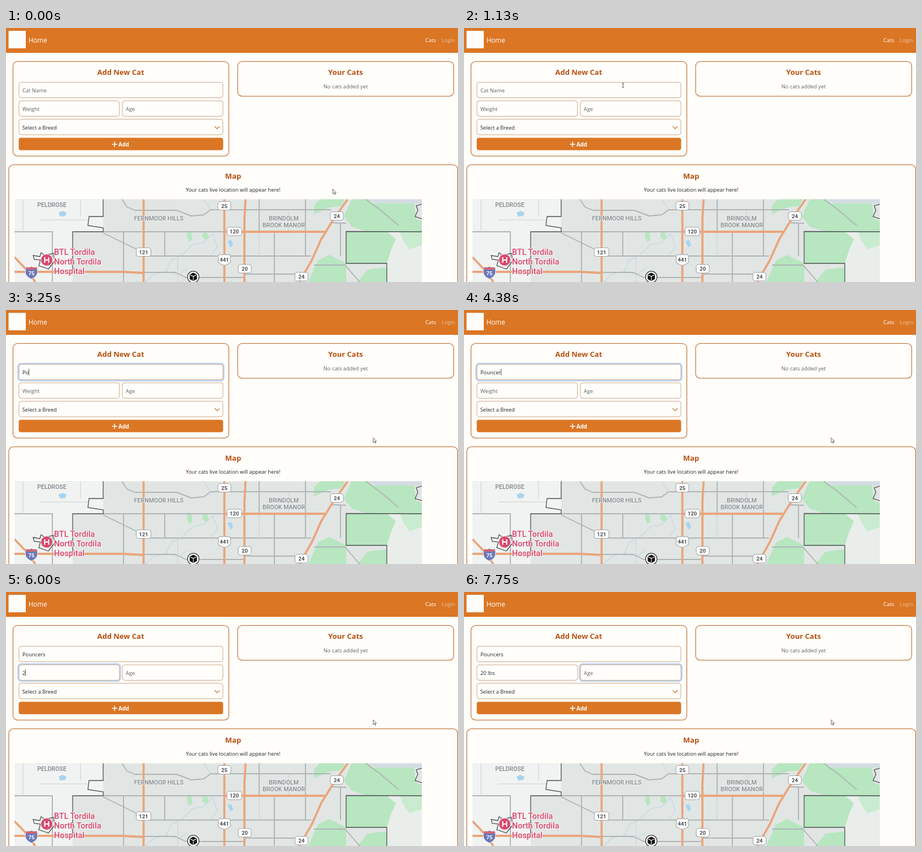
Recreate the animation shown at these times as an HTML page. Size 800 px wide and 450 px high, loop 8 s.

```html
<!DOCTYPE html>
<html lang="en">
<head>
<meta charset="utf-8">
<title>Add New Cat</title>
<style>
  html, body { margin: 0; width: 100%; height: 100%; overflow: hidden; background: #fffefb; }
  svg { display: block; width: 100vw; height: 100vh; }
  text { font-family: "Open Sans", "Noto Sans", sans-serif; font-size: 9.4px; fill: #22272a; }
  .mid { text-anchor: middle; }
  .title { font-size: 13px; font-weight: 700; fill: #b9500f; text-anchor: middle; }
  .card { fill: #fffefb; stroke: #c67c47; stroke-width: 1.3; }
  .field { fill: #fffefb; stroke: #c99d79; stroke-width: .9; }
  .hint { fill: #5c6461; }
  .map text { font-family: Roboto, sans-serif; }
  .map .area { font-size: 10.6px; font-weight: 500; fill: #85898c; text-anchor: middle;
    stroke: #eef1f1; stroke-width: 1.6; paint-order: stroke; }
  .map .place { font-size: 14.4px; font-weight: 500; fill: #d9486b;
    stroke: #f6f4f5; stroke-width: 2; paint-order: stroke; }
  .map .num { font-size: 9.6px; font-weight: 700; fill: #4c5053; text-anchor: middle; }
  .road { fill: none; stroke: #b0b4b5; stroke-width: 1.9; stroke-linejoin: round; }
  .main { fill: none; stroke: #eba57b; stroke-width: 3.8; }
  .edge { fill: none; stroke: #4d5052; stroke-width: 1.3; }
  .sign { fill: #fff; stroke: #a0a4a6; stroke-width: 1.1; }
</style>
</head>
<body>
<svg viewBox="0 0 800 450">
  <rect width="800" height="44" fill="#db7624"/>
  <rect x="4.5" y="5" width="30.5" height="31" fill="#fffdf9"/>
  <text x="39.7" y="25.6" style="font-size:11.7px;fill:#fff">Home</text>
  <text x="742" y="25" style="font-size:9.6px;fill:#fff">Cats</text>
  <text x="771" y="25" style="font-size:9.5px;fill:#f0c39d">Login</text>

  <rect class="card" x="12.4" y="59.3" width="382" height="167.6" rx="8"/>
  <rect class="card" x="410" y="59.3" width="382.4" height="61.6" rx="8"/>
  <rect class="card" x="4.9" y="242.4" width="794.5" height="240" rx="8"/>
  <text class="title" x="203" y="83.2">Add New Cat</text>
  <text class="title" x="601" y="83.2">Your Cats</text>
  <text class="title" x="402" y="266.6">Map</text>
  <text class="mid hint" x="601" y="107">No cats added yet</text>
  <text class="mid" x="402" y="290.3" style="font-size:9.27px">Your cats live location will appear here!</text>

  <g id="fields"></g>
  <rect class="field" x="22.9" y="161.7" width="361" height="27.4" rx="4"/>
  <text x="28.8" y="179.5" style="font-size:9.25px">Select a Breed</text>
  <path d="M369.7 174.6l4 4 4-4" fill="none" stroke="#d08045" stroke-width="1.4" stroke-linecap="round" stroke-linejoin="round"/>
  <rect x="22.5" y="194.4" width="361.8" height="22" rx="4" fill="#db7624"/>
  <path d="M192.2 202v8M188.2 206h8" stroke="#fff" stroke-width="1.7" stroke-linecap="round"/>
  <text x="199" y="209.5" style="font-size:9.7px;font-weight:700;fill:#fff">Add</text>

  <clipPath id="frame"><rect x="15" y="303.5" width="721" height="147"/></clipPath>
  <g class="map" clip-path="url(#frame)">
    <rect x="15" y="303" width="721" height="147" fill="#e1e6e4"/>
    <path d="M15 303H172V361H118V450H15Z" fill="#f1f3f2"/>
    <path d="M602 361H736V450H674V417H602Z" fill="#e9eeeb"/>
    <g fill="#b7e6c0">
      <path d="M545 330V314L556 303H600L593 316L572 318Z"/>
      <path d="M606 316L612 303H640L650 311H722L726 338L736 342V361H640L612 352L598 334Z"/>
      <path d="M602 361H674L690 374L682 392L674 417H602Z"/>
      <path d="M552 412L572 402L602 417V450H535Z"/>
      <path d="M622 450L640 428L674 424V450Z"/>
      <path d="M349 361l7 2 3 8-6 4-6-5ZM322 358l6 4 2 13-6 4-4-11Z"/>
    </g>
    <path d="M697 361H736V385L714 392L704 378Z" fill="#c9ebd0"/>
    <path d="M640 303H736V311H654Z" fill="#d4dce3"/>
    <g fill="#a8d4ef">
      <path d="M93 327l7-3 7 3-2 6-9 1Z"/>
      <path d="M392 377l7-1 3 9-5 4Z"/>
    </g>
    <path d="M247 450L262 436L284 431L292 412L312 402L330 384L350 380L366 364M284 431L305 437L322 426M366 364L374 388L362 404" fill="none" stroke="#bcd7e5" stroke-width="1.1"/>

    <path class="road" d="M172 361H386M172 363L229 391L256 404H540M205 303L214 317L228 323H302L328 333L350 331L362 322H575M15 361H82V450M208 361V450M281 361V404M448 303V361M475 361V450M530 303V404M592 346V404M243 433H300L318 442H422M422 436H515M602 346L575 345M545 420H600L626 450M636 303L662 322L695 350"/>
    <path d="M132 303V334M60 340H146M30 303V361M304 404V450M350 303L362 322M500 323V361M448 361V404" fill="none" stroke="#cdd1d2" stroke-width="1.1"/>
    <path class="main" d="M243.5 303V450M386.5 303V450M424 303L422 340V450M386 361H564M605 303L579 340L558 374L541 412L519 450M15 432H206L243 434"/>
    <path class="main" d="M15 406L36 428L52 450"/>
    <path class="edge" d="M172 303V334H147L145 350L172 354V361H118V432M736 361L602 360.5V417H674V450M736 312L726 315L729 323L724 334L736 338M48 403L60 405L62 398L69 403L84 399L86 413L75 427L58 421L61 411L50 410Z"/>

    <text class="area" x="81" y="317">PELDROSE</text>
    <text class="area" x="270.5" y="340.5">FERNMOOR HILLS</text>
    <text class="area" x="491.5" y="340.5">BRINDOLM</text>
    <text class="area" x="491.5" y="352.7">BROOK MANOR</text>
    <circle cx="72" cy="411" r="10.4" fill="#d9486b" stroke="#f7dfe5" stroke-width="1"/>
    <path d="M68.5 406v10M75.5 406v10M68.5 411h7" stroke="#fff" stroke-width="2.1"/>
    <text class="place" x="85" y="402">BTL Tordila</text>
    <text class="place" x="85" y="419">North Tordila</text>
    <text class="place" x="85" y="436">Hospital</text>

    <g id="signs"></g>
    <path class="sign" d="M378 401Q382 403 386.5 400.8Q391 403 395 401L398 405Q395 409 398 413Q397 418 386.5 420.5Q376 418 375 413Q378 409 375 405Z"/>
    <text class="num" x="386.5" y="414">441</text>
    <path d="M36 423Q40.5 425 45 422.5Q49.5 425 54 423Q61 438 45 445Q29 438 36 423Z" fill="#6b78b8" stroke="#f4f4f6"/>
    <path d="M36 423.5Q40.5 425.5 45 423Q49.5 425.5 54 423.5L55.5 428H34.5Z" fill="#cf6574"/>
    <text class="num" x="45" y="438" style="fill:#fff">75</text>

    <circle cx="331.5" cy="441" r="10.2" fill="#f8faf9" stroke="#3a3d3e" stroke-width="1.2"/>
    <path d="M331.5 433.6l6.4 3.2v8l-6.4 3.4l-6.4-3.4v-8Z" fill="#111"/>
    <path d="M325.8 437.4l5.7 2.7l5.7-2.7M331.5 440.1v7.4" fill="none" stroke="#f8faf9" stroke-width="1.1"/>
  </g>

  <path id="arrow" d="M0 0V8.4L2 6.6L3.3 9.6L4.5 9L3.2 6.2H5.9Z" fill="#fff" stroke="#444" stroke-width=".8"/>
  <path id="beam" d="M-1.7-4Q0-4 0-3Q0-4 1.7-4M0-3.5V3.5M-1.7 4Q0 4 0 3Q0 4 1.7 4" fill="none" stroke="#444" stroke-width=".9"/>
</svg>
<script>
const LOOP = 8000, TICK = 125, BLINK = 530;
const byId = id => document.getElementById(id);

function add(parent, tag, attrs, label = "") {
  const el = document.createElementNS("http://www.w3.org/2000/svg", tag);
  for (const key in attrs) el.setAttribute(key, attrs[key]);
  el.textContent = label;
  return parent.appendChild(el);
}

[["25", 386.5, 315], ["24", 585.5, 333], ["120", 404, 360.5], ["121", 243.5, 397],
 ["20", 422.5, 426.5], ["24", 523, 440.5]].forEach(([label, x, y]) => {
  const w = label.length > 2 ? 26 : 23;
  add(byId("signs"), "rect", { class: "sign", x: x - w / 2, y: y - 7.5, width: w, height: 15, rx: 4 });
  add(byId("signs"), "text", { class: "num", x, y: y + 3.5 }, label);
});

// keys: the times at which each letter of the value is typed
const fields = [
  { x: 22.9, y: 96.2, w: 361, hint: "Cat Name", value: "Pouncers", from: 2000, to: 4875,
    keys: [3125, 3250, 3500, 3625, 3750, 4000, 4375, 4500] },
  { x: 22.9, y: 129, w: 178, hint: "Weight", value: "20 lbs", from: 4875, to: 7125,
    keys: [6000, 6250, 6500, 6625, 6750, 7000] },
  { x: 206, y: 129, w: 178, hint: "Age", value: "", from: 7125, to: LOOP, keys: [] }
];
const HEIGHT = 27.4;

for (const f of fields) {
  const g = byId("fields"), box = { x: f.x, y: f.y, width: f.w, height: HEIGHT, rx: 4 };
  f.ring = add(g, "rect", { x: f.x - 1.4, y: f.y - 1.4, width: f.w + 2.8, height: HEIGHT + 2.8,
    rx: 5.2, fill: "none", stroke: "#bdd5f7", "stroke-width": 2.8 });
  add(g, "rect", { ...box, class: "field" });
  f.text = add(g, "text", { x: f.x + 6, y: f.y + 17.9 });
  f.caret = add(g, "rect", { y: f.y + 7.8, width: .8, height: 12, fill: "#333" });
}

// time, x, y of the pointer
const path = [[0, 578.5, 285.5], [125, 578.5, 285.5], [1000, 281.5, 101.5], [1125, 281.5, 101.5],
  [1500, 300.5, 115.3], [2500, 300.5, 115.3], [3125, 650, 226.5], [LOOP, 650, 226.5]];

function pointerAt(t) {
  const i = path.findIndex(p => p[0] > t);
  const [t0, x0, y0] = path[i - 1], [t1, x1, y1] = path[i];
  const u = (t - t0) / (t1 - t0), k = u * u * (3 - 2 * u);
  return [x0 + (x1 - x0) * k, y0 + (y1 - y0) * k];
}

function drawField(f, t) {
  const typed = f.keys.filter(k => k <= t);
  const value = f.value.slice(0, typed.length);
  const focused = t >= f.from && t < f.to;
  const sinceKey = t - Math.max(f.from, ...typed);
  f.text.textContent = value || f.hint;
  f.text.setAttribute("class", value ? "" : "hint");
  f.ring.style.display = focused ? "" : "none";
  f.caret.style.display = focused && Math.floor(sinceKey / BLINK) % 2 === 0 ? "" : "none";
  f.caret.setAttribute("x", f.x + 6 + (value ? f.text.getComputedTextLength() : 0));
}

function draw(now) {
  const t = Math.floor((now % LOOP) / TICK) * TICK;
  fields.forEach(f => drawField(f, t));
  const [x, y] = pointerAt(t);
  const overField = fields.some(f => x > f.x && x < f.x + f.w && y > f.y && y < f.y + HEIGHT);
  for (const id of ["arrow", "beam"]) {
    byId(id).setAttribute("transform", `translate(${x} ${y})`);
    byId(id).style.display = (id === "beam") === overField ? "" : "none";
  }
}

const start = performance.now();
function frame() {
  draw(performance.now() - start);
  requestAnimationFrame(frame);
}
frame();
</script>
</body>
</html>
```
